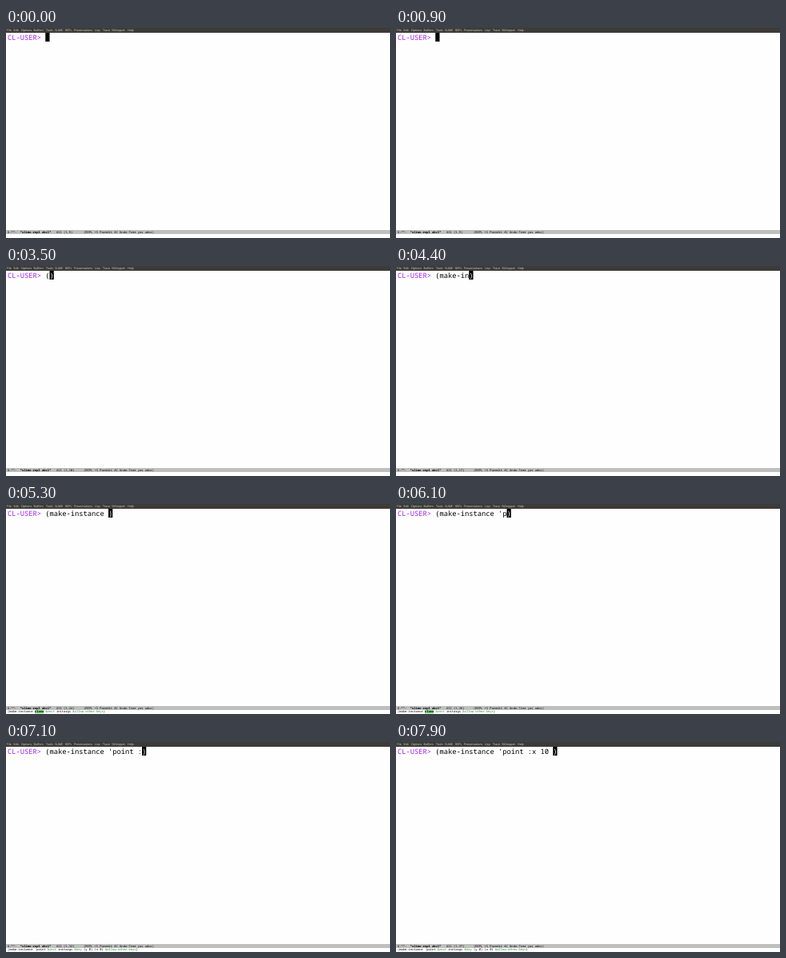
Animation, 480 px wide and 263 px high, one loop 8 s. Source, as an HTML page with a canvas:

```html
<!DOCTYPE html>
<html lang="en">
<head>
<meta charset="utf-8">
<title>REPL typing</title>
<style>
  html, body { margin: 0; width: 100%; height: 100%; overflow: hidden; background: #fefefe; }
  canvas { display: block; width: 100vw; height: 100vh; }
</style>
</head>
<body>
<canvas id="stage"></canvas>
<script>
const W = 480, H = 263, LOOP = 8000;
const canvas = document.getElementById('stage');
const ctx = canvas.getContext('2d');
const ratio = window.devicePixelRatio || 1;
canvas.width = W * ratio;
canvas.height = H * ratio;
ctx.scale(ratio, ratio);
ctx.textRendering = 'geometricPrecision';

const MONO = '"Noto Sans Mono", "DejaVu Sans Mono", monospace';
const LEFT = 2;
const BIG = { size: 8.75, advance: 5.25 };
const SMALL = { size: 3.77, advance: 2.26 };
const PURPLE = '#a020f0', GREEN = '#228b22';

const PROMPT = 'CL-USER> ';
const MENU = [
  ['File', 1], ['Edit', 9.5], ['Options', 19], ['Buffers', 34.5], ['Tools', 50], ['SLIME', 61],
  ['REPL', 74], ['Presentations', 85], ['Lisp', 111], ['Trace', 121], ['YASnippet', 132], ['Help', 152]
];

// Each burst types its text at an even pace: start time, ms per key.
const BURSTS = [
  ['(', 3200, 0],
  ['make-instance ', 3580, 125],
  ["'p", 5700, 250],
  ['oint', 6150, 150],
  [' :', 6900, 150],
  ['x 10 ', 7200, 150]
];
const GENERIC_HINT = 5200, POINT_HINT = 6900;

function typedAt(t) {
  return BURSTS.map(([text, start, pace]) =>
    [...text].filter((_, i) => t >= start + i * pace).join('')).join('');
}

function rect(x, y, w, h, color) {
  ctx.fillStyle = color;
  ctx.fillRect(x, y, w, h);
}

// Draws monospaced text from a column and returns the next column.
function mono(text, col, y, font, color, weight = 400) {
  ctx.font = `${weight} ${font.size}px ${MONO}`;
  ctx.fillStyle = color;
  ctx.fillText(text, LEFT + col * font.advance, y);
  return col + text.length;
}

function drawMenu() {
  rect(0, 0, W, 6, '#3c3b37');
  ctx.font = '3.6px "Open Sans", "Noto Sans", sans-serif';
  ctx.fillStyle = '#dfdbd2';
  for (const [label, x] of MENU) ctx.fillText(label, x, 4.3);
}

function drawInput(typed) {
  const y = 15;
  let col = mono(PROMPT, 0, y, BIG, PURPLE);
  col = mono(typed, col, y, BIG, '#000');
  rect(LEFT + col * BIG.advance, 6, BIG.advance, 11, '#000');
  if (typed) mono(')', col, y, BIG, '#fff');
}

function drawModeLine(column) {
  const y = 256.7;
  rect(0, 253, W, 5, '#bfbfbf');
  mono('U:**-', 0, y, SMALL, '#000');
  mono('*slime-repl abcl*', 7, y, SMALL, '#000', 700);
  mono(`All (1,${column})`, 27, y, SMALL, '#000');
  mono('(REPL +S Paredit AC Undo-Tree yas adoc)', 42, y, SMALL, '#000');
}

function drawHint(t) {
  if (t < GENERIC_HINT) return;
  const y = 261.4;
  const write = (text, col, color = '#000', weight) => mono(text, col, y, SMALL, color, weight);
  const isPoint = t >= POINT_HINT;
  let col = write('(make-instance ', 0);
  if (isPoint) {
    col = write("'point", col);
  } else {
    rect(LEFT + col * SMALL.advance, 258, 5 * SMALL.advance, 4.5, '#84dc84');
    col = write('class', col, '#000', 700);
  }
  col = write(' &rest', col, GREEN);
  col = write(' initargs ', col);
  if (isPoint) {
    col = write('&key', col, GREEN);
    col = write(' (y 0) (x 0) ', col);
  }
  col = write('&allow-other-keys', col, GREEN);
  write(')', col);
}

function frame(now) {
  const t = now % LOOP;
  const typed = typedAt(t);
  rect(0, 0, W, H, '#fefefe');
  drawMenu();
  drawInput(typed);
  drawModeLine(PROMPT.length + typed.length);
  drawHint(t);
  requestAnimationFrame(() => frame(performance.now() - start));
}

const start = performance.now();
frame(0);
</script>
</body>
</html>
```
